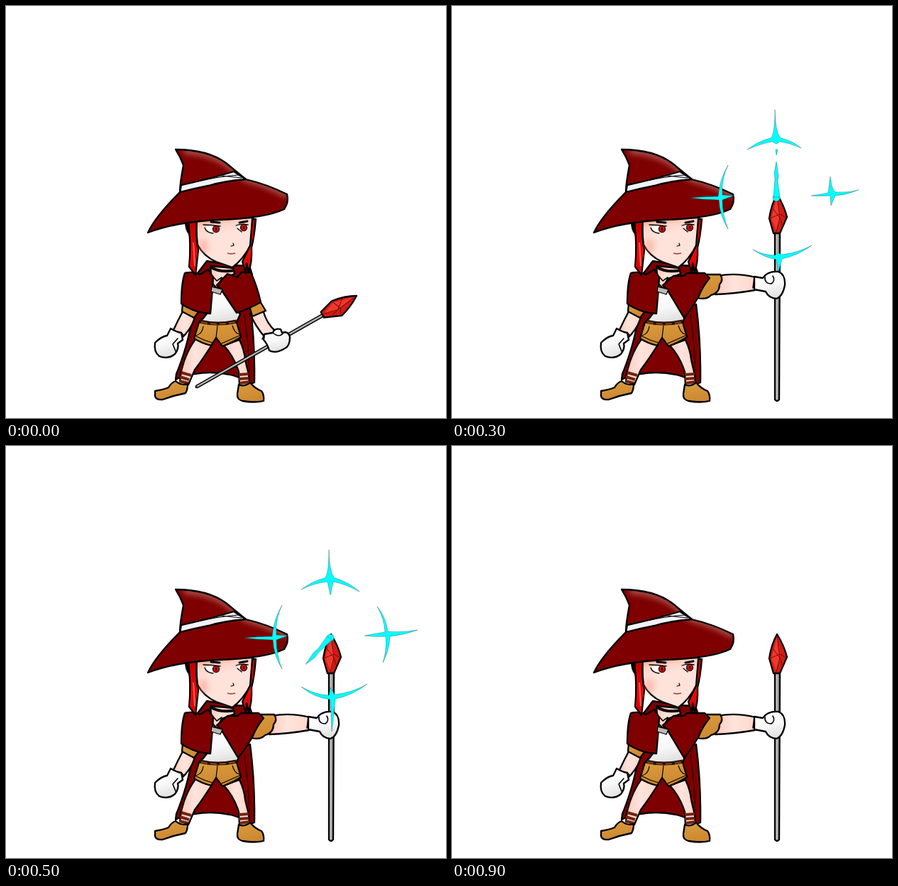
Write an HTML page that moves like this. It is 620x580 px and loops after 1 s.

```html
<!DOCTYPE html>
<html lang="en">
<head>
<meta charset="utf-8">
<title>Mage raising a staff</title>
<style>
html, body { margin: 0; width: 100%; height: 100%; overflow: hidden; background: #fff; }
svg { display: block; width: 620px; height: 580px; }
.ink { stroke: #000; stroke-width: 2.3; stroke-linejoin: round; stroke-linecap: round; }
.line { fill: none; stroke: #000; stroke-width: 1.6; stroke-linecap: round; stroke-linejoin: round; }
.red { fill: #7e0000; }
.tan { fill: url(#tan); }
.skin { fill: url(#skin); }
.white { fill: url(#cloth); }
.hair { fill: url(#hair); }
.spark { fill: #0ff; stroke: #022; stroke-width: .5; stroke-opacity: .6; }
.step { opacity: 0; animation: 1s step-end infinite; }
.low { animation-name: low; }
.rise { animation-name: rise; }
.mid { animation-name: mid; }
.high { animation-name: high; }
.faint { animation-name: faint; }
.full { animation-name: full; }
.hand { transform-origin: 457px 270px; animation: hand 1s step-end infinite; }
@keyframes low { 0% { opacity: 1 } 10%, 100% { opacity: 0 } }
@keyframes rise { 0% { opacity: 0 } 10% { opacity: 1 } 20%, 100% { opacity: 0 } }
@keyframes mid { 0% { opacity: 0 } 20% { opacity: 1 } 30%, 100% { opacity: 0 } }
@keyframes high { 0% { opacity: 0 } 30%, 100% { opacity: 1 } }
@keyframes faint { 0% { opacity: 0 } 30% { opacity: 1 } 40%, 100% { opacity: 0 } }
@keyframes full { 0% { opacity: 0 } 40% { opacity: 1 } 90%, 100% { opacity: 0 } }
@keyframes hand {
  0% { opacity: 0; transform: rotate(0) }
  30% { opacity: 1; transform: rotate(0) }
  40% { opacity: 1; transform: rotate(-70deg) }
  50% { opacity: 1; transform: rotate(-137deg) }
  70% { opacity: 1; transform: rotate(-233deg) }
  80% { opacity: 1; transform: rotate(-300deg) }
  90%, 100% { opacity: 0; transform: rotate(-360deg) }
}
</style>
</head>
<body>
<svg viewBox="0 0 620 580">
<defs>
  <linearGradient id="tan" x2=".3" y2="1"><stop stop-color="#dc9d40"/><stop offset="1" stop-color="#cd8830"/></linearGradient>
  <linearGradient id="skin" x2="1"><stop stop-color="#ffc9bc"/><stop offset=".45" stop-color="#ffe4dc"/><stop offset="1" stop-color="#ffd6cb"/></linearGradient>
  <linearGradient id="face" x2=".2" y2="1"><stop stop-color="#ff9c7c"/><stop offset=".22" stop-color="#ffd3c6"/><stop offset=".4" stop-color="#ffe2da"/><stop offset="1" stop-color="#ffe2da"/></linearGradient>
  <linearGradient id="cloth" x2=".3" y2="1"><stop stop-color="#fff"/><stop offset=".6" stop-color="#f8f8f8"/><stop offset="1" stop-color="#e2e2e2"/></linearGradient>
  <linearGradient id="hair" x2="0" y2="1"><stop stop-color="#b80000"/><stop offset=".6" stop-color="#f00808"/><stop offset="1" stop-color="#d80000"/></linearGradient>
  <linearGradient id="metal" x2="1"><stop stop-color="#d0d0d0"/><stop offset="1" stop-color="#888"/></linearGradient>
  <filter id="soft" x="-30%" y="-50%" width="160%" height="200%"><feGaussianBlur stdDeviation="4"/></filter>
  <path id="hatShape" d="M239,202Q284,202 310,221Q327,235 338,244Q368,251 396,265Q399,276 392,286Q365,299 300,301Q238,304 200,319Q210,297 245,262Q245,251 250,224Q246,213 239,202Z"/>
  <clipPath id="hatClip"><use href="#hatShape"/></clipPath>
  <!-- both upright, crystal tip at the origin -->
  <path id="rod" class="ink" d="M-3,54H4L3,289Q0,293-3,289Z" fill="url(#metal)"/>
  <g id="gem" class="ink">
    <path d="M0,0Q10,16 14,32L4,55H-5L-11,34Q-8,14 0,0Z" fill="#d01c14"/>
    <path d="M0,3L5,33L-1,52L-8,34Z" fill="#ee382e" stroke="none"/>
    <path d="M0,3L4,33L-1,53M-10,34L4,28L13,33M-6,20L4,33L8,46" fill="none" stroke="#7d0a08" stroke-width="1"/>
  </g>
</defs>

<!-- cape and legs -->
<path class="red ink" d="M264,432Q256,480 240,518L239,526Q252,518 266,518Q290,514 316,519Q332,523 345,532L350,530Q351,475 344,420Z"/>
<path class="line" d="M275,440Q270,485 263,516M336,435Q342,480 343,514" stroke-opacity=".5"/>
<path class="skin ink" d="M267,469L290,477Q276,499 266,512L257,533L245,528L247,514Q253,488 267,469Z"/>
<path class="skin ink" d="M307,478L329,470Q336,485 337,498L342,519L343,533L329,535L328,515Q321,493 307,478Z"/>
<path d="M247,516L261,520M245,522L258,526M244,528L257,531M328,519L342,518M328,525L342,524M329,531L343,529" stroke="#6e2410" stroke-width="4"/>
<path class="tan ink" d="M239,528Q247,535 256,532Q256,540 253,545Q237,548 221,554Q211,555 210,549V542Q222,540 229,537Q233,530 239,528Z"/>
<path class="tan ink" d="M328,533Q336,537 344,530Q350,538 360,542Q364,547 363,556Q350,559 333,556Q325,554 326,546Z"/>

<!-- trunk -->
<path class="tan ink" d="M272,445Q298,450 325,445L331,466Q319,474 305,479L296,467L289,478Q276,475 265,468Z"/>
<path class="line" d="M298,450L296,467M278,451Q277,461 268,464M319,450Q322,460 328,462M268,465Q279,471 291,474M304,475L329,464" style="stroke-width:1.2"/>
<path class="white ink" d="M288,402L305,400L330,434L325,445Q301,450 273,444Q285,435 288,420Z"/>
<path d="M273,444Q298,450 325,444" fill="none" stroke="#251008" stroke-width="5"/>
<path d="M275,445Q298,450 323,445" fill="none" stroke="#8b4920" stroke-width="2" stroke-dasharray="9 4"/>
<path class="red ink" d="M270,376L283,359L322,365L343,366L347,378L330,386L276,382Z"/>
<path class="skin ink" d="M288,366L320,369L322,377L304,384L297,397L290,390Z"/>
<path d="M289,368Q303,376 322,372" fill="none" stroke="#140000" stroke-width="4"/>
<path class="line" d="M291,380L297,387L304,382"/>
<path class="skin ink" d="M249,430L266,438Q262,453 249,466L236,456Q242,443 249,430Z"/>
<path class="tan ink" d="M249,418L248,430L265,439L271,431Z"/>
<path class="white ink" d="M232,454Q240,459 247,460L249,470L242,475Q244,482 238,490Q228,498 216,493Q208,487 210,474Q219,465 227,464Z"/>
<path class="line" d="M242,468L235,476L239,486M247,460L251,464"/>
<path class="red ink" d="M252,376Q263,373 273,378L285,371L292,382L291,398L288,433Q265,432 247,419Q247,390 252,376Z"/>

<!-- casting arm -->
<g class="step low">
  <g transform="translate(494 408) rotate(60.4)"><use href="#rod" transform="scale(.6 .895)"/><use href="#gem"/></g>
  <path class="skin ink" d="M344,433L362,428Q367,447 380,458L366,468Q350,449 344,433Z"/>
  <path class="tan ink" d="M343,422L358,416L366,429L347,437Z"/>
  <path class="red ink" d="M303,399L297,393L312,377L326,382L331,375L345,375Q354,395 359,417Q343,426 325,432Z"/>
  <path class="white ink" d="M364,462L376,460Q378,453 387,455L389,460Q398,457 400,466Q400,479 393,482Q380,490 371,485Q368,475 363,470Z"/>
  <path class="line" d="M376,460Q385,468 391,460M364,462L361,469"/>
</g>
<g class="step rise">
  <g transform="translate(497 375) rotate(50)"><use href="#rod" transform="scale(.65 .92)"/><use href="#gem"/></g>
  <path class="skin ink" d="M347,431L361,420Q374,432 389,439L380,453Q361,444 347,431Z"/>
  <path class="tan ink" d="M342,424L360,411L367,421L347,435Z"/>
  <path class="red ink" d="M303,399L297,393L312,380L326,380L331,375L345,376Q354,394 362,412Q344,422 330,436Z"/>
  <path class="white ink" d="M385,440L395,440Q398,432 405,434L407,438Q415,432 417,439Q422,445 420,454Q416,465 401,468Q389,467 386,458L380,452Z"/>
  <path class="line" d="M389,441Q396,449 405,442L407,438M385,440L380,446"/>
</g>
<g class="step mid">
  <g transform="translate(481 313) rotate(25)"><use href="#rod" transform="scale(.8 .96)"/><use href="#gem"/></g>
  <path class="skin ink" d="M359,417L371,401Q390,409 411,412L408,429Q381,429 359,417Z"/>
  <path class="tan ink" d="M346,418L363,397L376,404L361,424Z"/>
  <path class="red ink" d="M303,399L297,393L312,380L326,380L331,376L350,376Q358,387 365,398Q346,415 330,437Z"/>
  <path class="white ink" d="M410,409L422,410Q431,402 442,408Q450,416 448,427Q443,440 431,440Q420,438 418,431L405,430Z"/>
  <path class="line" d="M424,411Q422,421 433,422L438,414"/>
</g>
<g class="step high">
  <g transform="translate(458 265)"><use href="#rod"/><use href="#gem"/></g>
  <path class="skin ink" d="M374,380Q400,375 428,382L427,400Q398,405 371,406Z"/>
  <path class="tan ink" d="M358,378L378,378Q383,386 377,392Q377,404 365,407Q359,414 346,411Z"/>
  <path class="red ink" d="M303,399L297,393L312,380L326,380L331,376L356,376L363,383Q353,395 347,410Q337,427 327,439Z"/>
  <path class="white ink" d="M426,381L438,383Q444,373 460,374Q470,378 469,393Q466,409 457,412Q446,411 442,402L426,399Z"/>
  <path class="line" d="M441,381Q440,391 450,391Q456,387 452,380M426,382L424,397"/>
</g>
<path class="ink" d="M290,395L305,399L302,406L289,402Z" fill="#bbb9b4" style="stroke-width:1.3"/>

<!-- head -->
<path d="M252,304Q252,315 257,321L268,370L273,303Z"/>
<path class="ink" fill="url(#face)" d="M268,298Q268,320 270,336Q278,352 296,360L319,368Q334,357 345,336L348,298Z"/>
<ellipse cx="278" cy="338" rx="7" ry="11" fill="#ff8a74" opacity=".45" filter="url(#soft)"/>
<path class="hair ink" d="M347,300H352Q350,325 346,340Q347,360 342,374L339,362L338,376L333,360L344,337Z"/>
<path class="hair ink" d="M257,302L269,301Q267,330 271,343L267,379L258,367Q261,338 257,302Z"/>
<path d="M264,333L266,366" stroke="#ff5c50" stroke-width="2"/>
<path d="M280,311Q291,306 302,311L300,319Q288,323 280,311ZM325,310Q333,305 341,309L340,317Q330,320 325,310Z" fill="#fff"/>
<circle cx="296" cy="314" r="4.6" fill="#c0100c" stroke="#300" stroke-width="1.3"/>
<circle cx="335" cy="312" r="4.6" fill="#c0100c" stroke="#300" stroke-width="1.3"/>
<path d="M296,312V316M335,310V314" stroke="#200" stroke-width="2"/>
<path class="line" d="M278,308Q289,308 302,310M280,312Q282,319 292,320M324,309Q333,306 341,308M326,313L332,318" style="stroke-width:1.3"/>
<path class="line" d="M289,304L301,305M329,305L340,303" style="stroke-width:3"/>
<path class="line" d="M320,334L321,337L317,338" style="stroke-width:1.2"/>
<path d="M312,348L317,349L323,348" fill="none" stroke="#a83b30" stroke-width="1.7"/>

<!-- hat -->
<use href="#hatShape" class="red"/>
<g clip-path="url(#hatClip)">
  <path d="M250,204Q290,207 313,224L338,244Q366,250 397,267" fill="none" stroke="#e0b0a0" stroke-width="6" opacity=".65" filter="url(#soft)"/>
</g>
<path class="ink" fill="#f4f2f5" d="M247,252Q285,244 321,233L338,244Q310,246 285,253Q265,257 245,262Z"/>
<path class="line" d="M270,247Q300,240 327,238M304,239L332,242" style="stroke-width:1.1"/>
<use href="#hatShape" class="ink" fill="none"/>

<!-- magic -->
<g class="spark">
  <g class="step faint">
    <path d="M455,146Q456,182 464,186Q480,190 492,200Q476,193 462,191L457,194L451,191Q434,194 416,202Q434,189 449,186Q455,181 455,146ZM456,202H459L457,210Z"/>
    <path d="M533,240Q535,260 541,262Q558,263 573,259Q556,266 540,267L534,281L533,267Q520,268 506,267Q521,265 530,263Z"/>
    <path d="M424,343Q440,351 455,351L459,347L464,350Q486,348 507,337Q488,351 465,356L460,374L457,357Q440,354 424,343Z"/>
  </g>
  <g class="step full">
    <path d="M455,146Q456,182 464,186Q482,191 498,205Q478,194 461,191L457,210L453,191Q434,193 416,202Q434,189 449,186Q455,181 455,146Z"/>
    <path d="M523,226Q535,240 538,261Q560,263 580,259Q561,266 541,268Q540,288 531,305Q537,286 535,268Q521,269 505,267Q521,264 534,262Q533,243 523,226Z"/>
    <path d="M416,339Q438,351 455,351L457,340L463,350Q489,347 509,335Q489,351 464,356Q462,378 459,402Q458,377 457,357Q434,354 416,339Z"/>
  </g>
  <g class="step faint"><path id="westStar" d="M389,224Q379,244 381,266L397,267L381,273Q381,295 389,314Q377,295 376,273Q355,273 335,270Q357,268 375,268Q377,244 389,224Z"/></g>
  <g class="step full"><use href="#westStar"/></g>
  <g class="hand">
    <circle cx="457" cy="270" r="5"/>
    <path d="M453,269L455,243L454,235L457,219L460,239L459,247L462,269Z"/>
  </g>
</g>
</svg>
</body>
</html>
```
